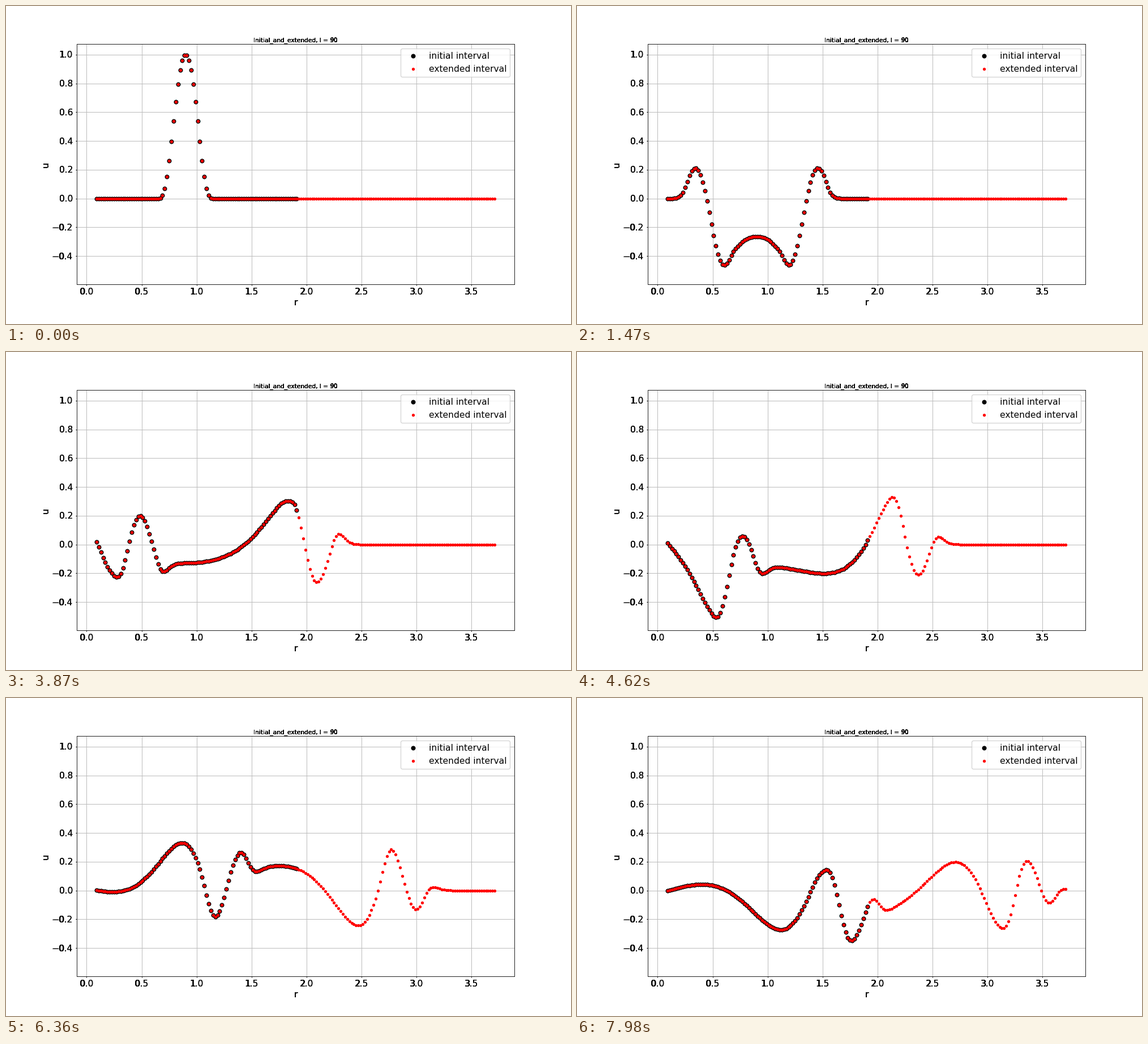
Animation, 998 px wide and 561 px high, one loop 8000 ms. Source, as a matplotlib script:

```python
import numpy as np
import matplotlib.pyplot as plt
from matplotlib.animation import FuncAnimation

W, H, DPI = 998, 561, 100
LOOP, TICK, STEP = 8000, 20, 30      # ms: loop, drawing interval, time per wave step
DR, DT, MASS = 0.02, 0.01, 6.0
LEFT, CELLS = 0.1, 260               # wall position, cells in the computing domain
N_INITIAL, N_EXTENDED = 92, 182      # plotted points, ghost points included
PT = 72 / DPI                        # points per pixel

plt.rcParams["font.family"] = "DejaVu Sans"


def bump(r, a=0.6, b=1.2):
    """Smooth pulse that vanishes outside (a, b)."""
    u = np.zeros_like(r)
    k = (r > a) & (r < b)
    u[k] = np.exp(-(2 * r[k] - a - b) ** 2 / ((r[k] - a) * (b - r[k])))
    return u


def acceleration(u):
    """u_rr - m^2 u, with u = 0 half a cell beyond both ends."""
    padded = np.concatenate([-u[:1], u, -u[-1:]])
    return np.diff(padded, 2) / DR**2 - MASS**2 * u


def solve_wave(steps):
    """Leapfrog solution of u_tt = u_rr - m^2 u, starting at rest."""
    r = LEFT + (np.arange(CELLS) + 0.5) * DR
    u = np.zeros((steps, CELLS))
    u[0] = bump(r)
    u[1] = u[0] + DT**2 / 2 * acceleration(u[0])
    for n in range(2, steps):
        u[n] = 2 * u[n - 1] - u[n - 2] + DT**2 * acceleration(u[n - 1])
    ghost = -u[:, :1]
    return np.hstack([ghost, u])[:, :N_EXTENDED]


radius = LEFT + (np.arange(N_EXTENDED) - 0.5) * DR
wave = solve_wave(-(-LOOP // STEP))

fig = plt.figure(figsize=(W / DPI, H / DPI), dpi=DPI, facecolor="white")
ax = fig.add_axes([0.125, 0.125, 0.775, 0.755])
margin = 0.05 * (radius[-1] - radius[0])
ax.set_xlim(radius[0] - margin, radius[-1] + margin)
ax.set_ylim(-0.596, 1.073)

x_ticks = np.arange(0, 3.6, 0.5)
y_ticks = np.arange(-2, 6) * 0.2
ax.set_xticks(x_ticks)
ax.set_yticks(y_ticks)
ax.tick_params(labelbottom=False, labelleft=False, length=2.5 * PT, width=PT)
ax.set_axisbelow(True)
ax.grid(color="#bcbcbc", linewidth=PT)
for spine in ax.spines.values():
    spine.set(linewidth=PT, color="#222222")


def heavy_text(x, y, text, size, copies=2, **style):
    """Text at pixel (x, y) from the top left, overprinted to look heavier."""
    for _ in range(copies):
        fig.text(x / W, 1 - y / H, text, fontsize=size * PT,
                 va="baseline", **style)


def tick_label(x, y, value, size=15.4, centred=False):
    """Number ending at x, or centred on it, with a thickened leading part."""
    text = f"{abs(value):.1f}"
    width = 1.59 * size
    if value < -0.01:
        text = "\u2212" + text
        width += 0.838 * size
    start = x - (width / 2 if centred else width)
    heavy_text(start, y, text, size)
    heavy_text(start + 0.8, y, text[:-2], size, copies=1)


def to_pixels(x, y):
    px, py = ax.transData.transform((x, y))
    return px, H - py


for value in x_ticks:
    tick_label(to_pixels(value, 0)[0], 509, value, centred=True)
for value in y_ticks:
    tick_label(118, to_pixels(0, value)[1] + 5.6, value)

heavy_text(512, 527.5, "r", 15.6, copies=3, ha="center")
heavy_text(74.5, 280, "u", 15.6, copies=3, ha="center", rotation=90,
           rotation_mode="anchor")
heavy_text(511.5, 62.7, "Initial_and_extended, I = 90", 10.45, copies=5, ha="center")
heavy_text(572.5, 62.7, "90", 10.45, copies=1)


def dots(count, colour, size, label):
    line, = ax.plot(radius[:count], wave[0, :count], "o", color=colour,
                    markersize=size * PT, markeredgewidth=0, label=label)
    return line


black = dots(N_INITIAL, "black", 8.0, "initial interval")
red = dots(N_EXTENDED, "red", 5.3, "extended interval")
ax.legend(loc="upper right", fontsize=15.57 * PT, numpoints=1)


def update(k):
    u = wave[(k * TICK + TICK // 2) // STEP]
    black.set_ydata(u[:N_INITIAL])
    red.set_ydata(u)
    return black, red


anim = FuncAnimation(fig, update, frames=LOOP // TICK, interval=TICK,
                     init_func=lambda: update(0), repeat=True, repeat_delay=0)
plt.show()
```
